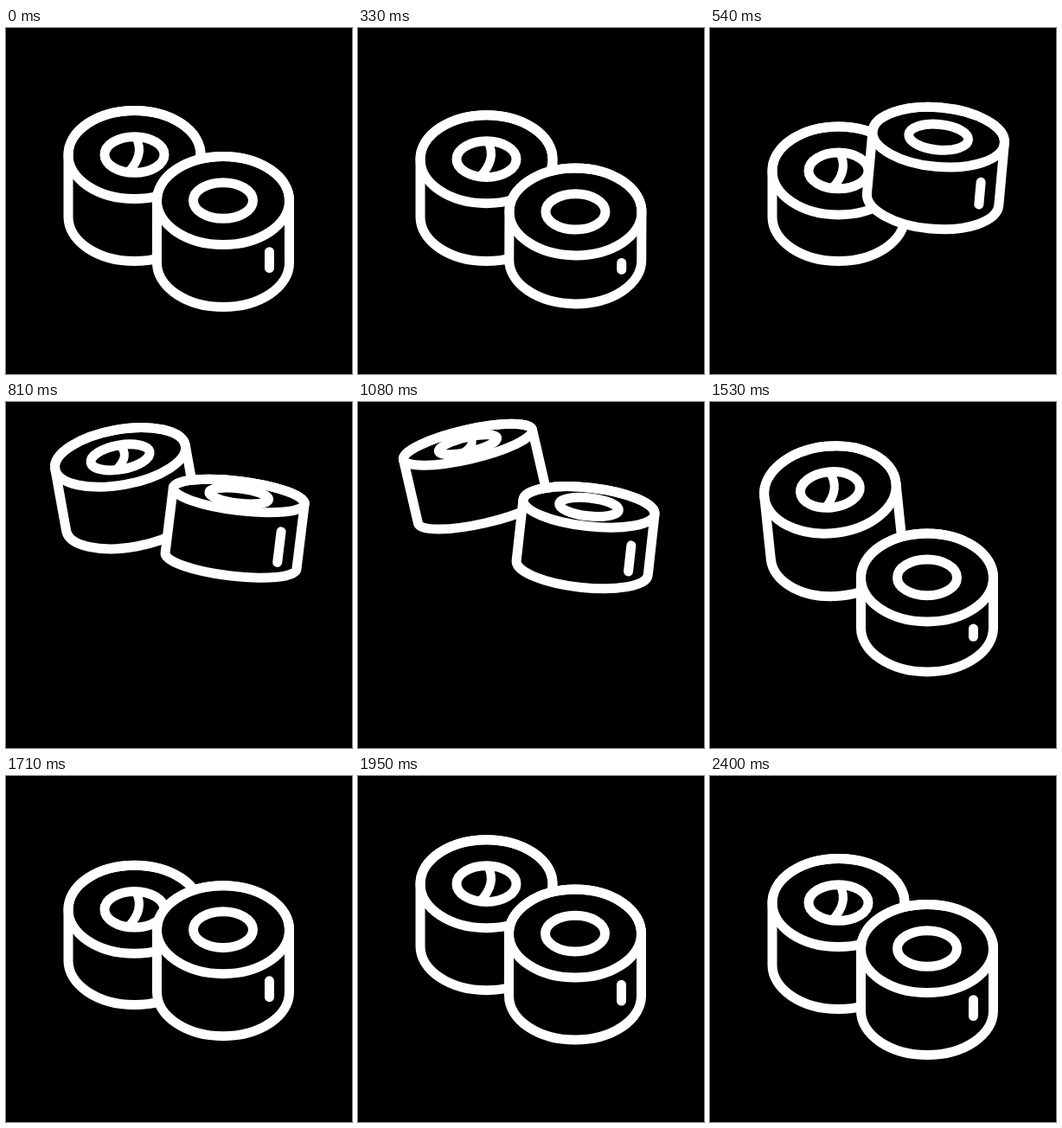
Recreate the animation shown at these times as an HTML page with a canvas. Size 400 by 400 pixels, loop 2430 ms.

```html
<!DOCTYPE html>
<html>
<head>
<meta charset="utf-8">
<style>
html, body { margin: 0; width: 100%; height: 100%; overflow: hidden; background: #000; }
canvas { display: block; width: 400px; height: 400px; }
</style>
</head>
<body>
<canvas id="stage" width="400" height="400"></canvas>
<script>
const ctx = document.getElementById('stage').getContext('2d');
const LOOP = 2430, RX = 76.5, RY = 51;
const LAND = 1420, SETTLE = 2150, BOUNCE = 23;

// Tracks are [time, value] pairs joined by a monotone cubic.
const HOP = [[300, 0], [540, .835], [810, .995], [1050, .927], [1290, .466], [1420, 0], [1480, -.3]];
const LEAN = [[300, 0], [540, .74], [810, 1], [1050, .93], [1290, .46], [1440, 0]];
const FLAT = [[300, 0], [540, .49], [810, 1], [1050, .9], [1290, .02], [1340, 0]];
const HEIGHT = [[0, 72], [270, 52.5], [300, 53.5], [420, 66], [540, 72], [810, 76], [1050, 71],
  [1290, 73], [1420, 65], [1500, 57.5], [1530, 58], [1710, 72]];

const back = { x: 148.5, y: 218.5, lag: 240, hop: 96, tilt: -13, sway: -4.5, filling: true };
const front = { x: 251, y: 271.5, lag: 0, hop: 88, tilt: 7, sway: 9, shine: true };

function sample(track, t) {
  const last = track.length - 1;
  if (t <= track[0][0]) return track[0][1];
  if (t >= track[last][0]) return track[last][1];
  let i = 0;
  while (t >= track[i + 1][0]) i++;
  const secant = j => (track[j + 1][1] - track[j][1]) / (track[j + 1][0] - track[j][0]);
  const slope = j => {
    if (j === 0 || j === last) return 0;
    const a = secant(j - 1), b = secant(j);
    return a * b <= 0 ? 0 : 2 * a * b / (a + b);
  };
  const [t0, v0] = track[i], [t1, v1] = track[i + 1];
  const d = t1 - t0, u = (t - t0) / d, w = 1 - u;
  return w * w * (1 + 2 * u) * v0 + u * u * (3 - 2 * u) * v1
    + d * u * w * (w * slope(i) - u * slope(i + 1));
}

function rise(roll, t) {
  if (t < LAND) return roll.hop * Math.max(0, sample(HOP, t));
  if (t < SETTLE) return BOUNCE * Math.sin(Math.PI * (t - LAND) / (SETTLE - LAND));
  return 0;
}

function ring(rx, ry) {
  ctx.beginPath();
  ctx.ellipse(0, 0, rx, ry, 0, 0, 2 * Math.PI);
  ctx.stroke();
}

function drawRoll(roll, time) {
  const t = time - roll.lag;
  const lean = sample(LEAN, t), height = sample(HEIGHT, t);
  const ry = RY - 34 * sample(FLAT, t);
  const holeRy = .36 * ry + 2.5;

  ctx.save();
  ctx.translate(roll.x + roll.sway * lean, roll.y - rise(roll, t));
  ctx.rotate(roll.tilt * lean * Math.PI / 180);
  ctx.translate(0, -height);
  ctx.lineWidth = 11;

  ctx.beginPath();
  ctx.ellipse(0, 0, RX, ry, 0, Math.PI, 2 * Math.PI);
  ctx.ellipse(0, height, RX, ry, 0, 0, Math.PI);
  ctx.closePath();
  ctx.fill();
  ctx.stroke();
  ring(RX, ry);
  ring(34.5, holeRy);

  if (roll.filling) {
    const k = holeRy / 20;
    ctx.lineWidth = 10;
    ctx.beginPath();
    ctx.moveTo(2, -19 * k);
    ctx.quadraticCurveTo(12, 0, -7, 19 * k);
    ctx.stroke();
  }
  if (roll.shine) {
    ctx.beginPath();
    ctx.moveTo(53.5, 23 + .71 * ry);
    ctx.lineTo(53.5, 78 + .69 * (height - 72) + .29 * (ry - RY));
    ctx.stroke();
  }
  ctx.restore();
}

function draw(now) {
  const time = now % LOOP;
  ctx.fillStyle = '#000';
  ctx.strokeStyle = '#fff';
  ctx.lineCap = ctx.lineJoin = 'round';
  ctx.fillRect(0, 0, 400, 400);
  drawRoll(back, time);
  drawRoll(front, time);
}

const start = performance.now();
function tick() {
  draw(performance.now() - start);
  requestAnimationFrame(tick);
}
tick();
</script>
</body>
</html>
```
